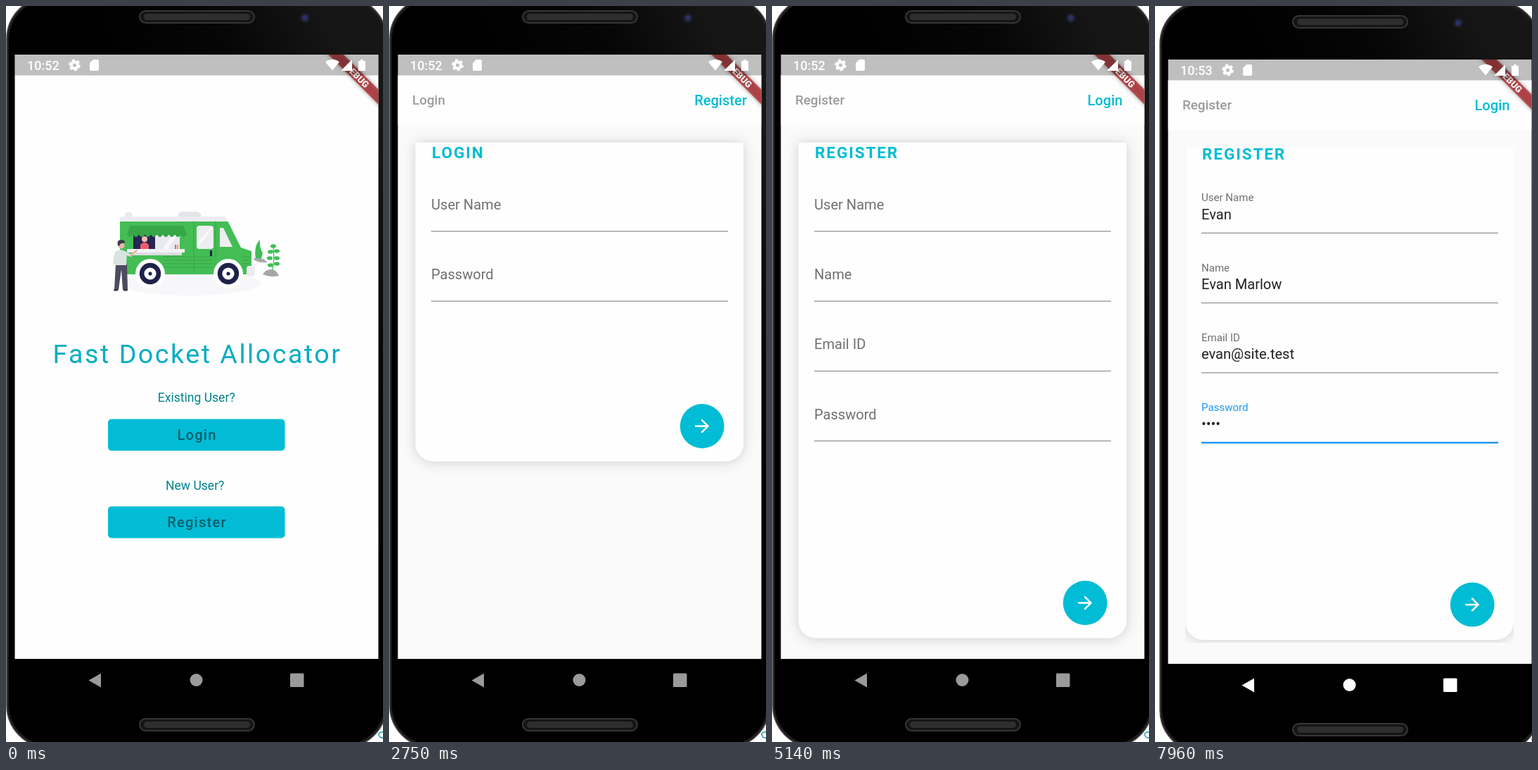
Animation of 536 by 1045 pixels, one loop 8 s. Source, as an HTML page:

```html
<!DOCTYPE html>
<html lang="en">
<head>
<meta charset="utf-8">
<title>App sign-up walkthrough</title>
<style>
  html, body { margin: 0; width: 100%; height: 100%; overflow: hidden; background: #fff; }
  svg { display: block; width: 536px; height: 1045px; font-family: Roboto, sans-serif; }
  text { white-space: pre; }
  .mid { text-anchor: middle; }
  .med { font-weight: 500; }
  .bold { font-weight: 700; }
  .black { font-weight: 900; }
  .line { fill: none; stroke-linecap: round; stroke-linejoin: round; }
  .card { filter: drop-shadow(0 1px 9px rgba(20, 20, 50, .19)); }
</style>
</head>
<body>
<svg id="stage" viewBox="0 0 536 1045"></svg>
<script>
const LOOP = 8000, TEAL = '#00bcd4', BLUE = '#2196f3', SLATE = '#455a64';
const START = performance.now();

const text = (x, y, size, fill, str, cls = '', ls = 0) =>
  `<text x="${x}" y="${y}" font-size="${size}" fill="${fill}" class="${cls}" letter-spacing="${ls}">${str}</text>`;
const rect = (x, y, w, h, fill, rx = 0, more = '') =>
  `<rect x="${x}" y="${y}" width="${w}" height="${h}" rx="${rx}" fill="${fill}" ${more}/>`;
const circle = (x, y, r, fill, more = '') => `<circle cx="${x}" cy="${y}" r="${r}" fill="${fill}" ${more}/>`;
const path = (d, fill, more = '') => `<path d="${d}" fill="${fill}" ${more}/>`;
const line = (d, stroke, w) => `<path class="line" d="${d}" stroke="${stroke}" stroke-width="${w}"/>`;
const group = (id, body, more = '') => `<g id="${id}" ${more}>${body}</g>`;
const clip = (id, x, y, w, h) => `<clipPath id="${id}">${rect(x, y, w, h, '#000')}</clipPath>`;
const band = (y, h, fill) => rect(12.5, y, 517, h, fill);

// Welcome screen
const wheel = x => circle(x, 380, 21, '#fff') + circle(x, 380, 15.2, '#1e2248') +
  circle(x, 380, 8.6, '#fff') + circle(x, 380, 2.6, '#1e2248');

function truck() {
  const scallops = 'M176 312H252L257 324' + 'q-4.25 8 -8.5 0'.repeat(10);
  const ribs = [356, 361, 366, 371].map(y => line(`M224 ${y}H294M336 ${y}H346`, '#38a548', 1)).join('');
  const leaves = [[380, 341], [376, 349], [385, 348], [375, 358], [385, 358], [376, 368], [385, 366]];
  return `<ellipse cx="262" cy="394" rx="100" ry="17" fill="#f7f7fa"/>` +
    rect(169, 293, 11, 8, '#e9e9ee', 4) + path('M245 300V296Q246 292 251 292H271Q277 292 278 300Z', '#e4e4ea') +
    path('M162 305H315L334 343L349 348V381H170L162 348Z', '#43bd54') +
    path('M162 306V302Q162 299 166 299H311L316 306Z', '#ececf0') + ribs +
    line('M267 306V378M298 306V358', '#38a548', 1) +
    rect(181, 325, 32, 21, '#262650') + rect(212, 325, 35, 21, '#e9e9f0') +
    path('M222 346L236 325H244L230 346Z', '#f7f7fb') +
    circle(197, 331, 4, '#f2b9ae') + path('M191 345V339Q197 332 203 339V345Z', '#ee5c6c') +
    path(scallops + 'Z', '#36a647') +
    rect(172, 345, 82, 5, '#f3f3f6') + rect(180, 350, 70, 4, '#dcdce3') +
    rect(240, 339, 2, 6, '#ee5c6c') + rect(243, 339, 2, 6, '#f0a23c') +
    rect(271, 312, 24, 33, '#ededf2', 4) + path('M273 336L291 314H295L274 341Z', '#fbfbfd') +
    path('M304 315H309L322 342H304Z', '#ededf2') + rect(290, 347, 3, 8, '#1e2248') +
    rect(342, 369, 12, 15, '#ececf0', 4) + wheel(205) + wheel(316) +
    path('M156 366H172L173 403H166L164 374L160 403H154Z', '#4b4b60') +
    line('M154 403.5H158M168 403.5H172', '#2d2d40', 2) +
    path('M155 349Q163 343 172 350L171 368H155Z', '#d9e4e2') +
    line('M156 352L154 365M172 352L177 354', '#d9e4e2', 4) + line('M177 354L186 347', '#eeb4a6', 2.5) +
    circle(164, 340, 4.6, '#eeb4a6') + path('M159 340Q157 331 165 332Q171 333 168 337Q162 336 161 341Z', '#3b3b4e') +
    path('M355 360Q352 340 361 332Q360 342 365 351L362 362Z', '#3fbf55') +
    path('M352 358Q353 365 372 364L366 359Z', '#a9a9ae') +
    path('M365 381Q369 374 377 374Q384 374 388 383Q376 386 365 381Z', '#a5a5a9') +
    line('M379 374Q382 360 380 343', '#3fbf55', 1.3) +
    leaves.map(([x, y]) => `<ellipse cx="${x}" cy="${y}" rx="4" ry="2.8" fill="#3fbf55"/>`).join('');
}

const button = (y, label) => rect(145, y, 251.5, 45, '#02bcd6', 5) +
  text(271.5, y + 29.5, 20.08, '#075f6d', label, 'mid med', 1.25);

const home = band(69, 858, '#fdfefd') + truck() +
  text(272, 507, 37.65, '#06acc3', 'Fast Docket Allocator', 'mid', 2.5) +
  text(270.7, 562, 17.57, '#00838f', 'Existing User?', 'mid') + button(586.5, 'Login') +
  text(268.7, 687, 17.57, '#00838f', 'New User?', 'mid') + button(710.5, 'Register');

// Form pages
function field(label, i, { values = [], focus = -1 }) {
  const y = 320 + i * 99.2, on = i === focus, up = on || values[i];
  return text(60, up ? y - 45 : y - 31, up ? 15.06 : 20.08, on ? BLUE : '#707070', label) +
    text(60, y - 19.5, 20.08, '#202020', values[i] || '') +
    rect(60, y - (on ? 1.2 : .7), 422, on ? 2.5 : 1.3, on ? BLUE : '#949494');
}

const arrow = (x, y) => path('M0 -8l-1.41 1.41L4.17 -1H-8v2H4.17l-5.58 5.59L0 8l8-8z', '#fff',
  `transform="translate(${x} ${y}) scale(1.255)"`);

function page(title, action, labels, bottom, opt = {}) {
  const { clipId, scroll = 0 } = opt, fabY = bottom - 50;
  const card = path(`M37.5 194H504V${bottom - 25}a25 25 0 0 1 -25 25H62.5a25 25 0 0 1 -25 -25Z`, '#fdfefd', 'class="card"') +
    text(61, 216, 22.6, TEAL, title.toUpperCase(), 'bold', 1.88) +
    labels.map((l, i) => field(l, i, opt)).join('') +
    circle(445.2, fabY, 31.4, TEAL) + arrow(445.2, fabY);
  return band(98, 829, '#fafafa') +
    `<g ${clipId ? `clip-path="url(#${clipId})"` : ''}><g transform="translate(0 ${-scroll})">${card}</g></g>` +
    band(98, 71, '#fdfefd') +
    text(33, 140, 18.83, '#9b9c9e', title, 'med') +
    text(action === 'Login' ? 473.5 : 471.5, 141, 20.08, TEAL, action, 'mid med');
}

const register = opt => page('Register', 'Login', ['User Name', 'Name', 'Email ID', 'Password'], 897.5, opt);

// Keyboard
function keyboard() {
  const row = (keys, x, y) => [...keys].map((k, i) => text(x + i * 51.1, y, 32.5, '#0f1b20', k, 'mid')).join('');
  const digits = [...'1234567890'].map((d, i) => text(56 + i * 51.1, 651, 13.5, '#7b858a', d, 'mid med')).join('');
  return band(572, 355, '#eceff1') + band(572, 56, '#e4e7e9') +
    path('M12 585H23a15 15 0 0 1 0 30H12Z', '#fff') + line('M22 595l6 5.5l-6 5.5', '#263238', 2.4) +
    text(269.5, 608, 20, '#4db6ac', 'Suggest contacts? Tap for info.', 'mid') +
    rect(501, 589, 7, 14, SLATE, 3.5) + line('M497.5 599a7 7 0 0 0 14 0M504.5 606V610', SLATE, 2) +
    digits + row('qwertyuiop', 40, 676) + row('asdfghjkl', 66, 750) + row('zxcvbnm', 117, 823) +
    line('M53 801L66 814H59.5V825H46.5V814H40Z', SLATE, 2.2) +
    line('M481 803H502V825H481L473 814ZM485 809.5l9 9m0 -9l-9 9', SLATE, 2.2) +
    text(53, 893, 21.5, '#37474f', '?123', 'mid med') + row(',', 117, 895) + row('.', 424, 896) +
    circle(168, 885, 11.8, 'none', `stroke="${SLATE}" stroke-width="2.2"`) +
    circle(164, 882, 1.8, SLATE) + circle(172, 882, 1.8, SLATE) + line('M162.5 888Q168 895 173.5 888', SLATE, 2) +
    rect(206, 867, 180, 36, '#c9cdd0', 3) +
    circle(488, 885.5, 22, '#4db6ac') + line('M479 886l6.5 6.5l12 -13', '#fff', 2.4);
}

// Phone shell and system bars
const speaker = y => rect(190, y, 163, 17, '#151515', 8.5, 'stroke="#363636" stroke-width="2"') +
  rect(196, y + 4, 151, 9, '#2e2e2e', 4.5);

const shell = rect(1, -13, 540, 1066, '#1d1d1d', 60, 'stroke="#4a4a4a" stroke-width="1.5"') +
  rect(4, -9, 534, 1058, 'url(#sheen)', 57) + speaker(7) + speaker(1012) +
  circle(425, 17, 7, '#1b1d2a') + circle(425, 17, 4, '#2a3060') + band(927, 60, '#000');

// The system bar is a dark veil over the app, with its icons on top
const status = band(69, 29.5, 'rgba(0,0,0,.25)') +
  `<text id="clock" x="30" y="90.5" font-size="18" fill="#fff" class="med"></text>` +
  circle(97.5, 84, 4.6, 'none', 'stroke="#fff" stroke-width="4"') +
  circle(97.5, 84, 7.2, 'none', 'stroke="#fff" stroke-width="2.4" stroke-dasharray="4 3.54"') +
  path('M124 76H130a2 2 0 0 1 2 2V90a2 2 0 0 1 -2 2H121a2 2 0 0 1 -2 -2V81Z', '#fff') +
  path('M454 79.5Q464 72 474 79.5L464 91.5Z', '#fff') + path('M492 76V92H476Z', '#fff') +
  path('M504 76H508V78H511V92H501V78H504Z', '#fff');

const ribbon = `<g transform="translate(529.5 69) rotate(45)">` +
  rect(-55, 35.1, 110, 15.1, 'rgba(171,30,34,.75)', 0, 'style="filter:drop-shadow(0 0 3px rgba(0,0,0,.45))"') +
  text(0, 47.2, 12.8, '#fff', 'DEBUG', 'mid black') + `</g>`;

const keyDots = [952, 956.5].map(y => [477, 481.5, 486, 490.5, 495]
  .map(x => rect(x - 1.2, y, 2.4, 2.4, 'currentColor')).join('')).join('');
const nav = group('back', path('M117.5 957.5L135 947.5V967.5Z', 'currentColor')) +
  group('down', path('M118 949H138L128 966.5Z', 'currentColor') + keyDots + rect(480, 961, 12, 2.2, 'currentColor')) +
  circle(270.5, 957, 9, 'currentColor') + rect(404, 947.5, 19.5, 19.5, 'currentColor', 1.5);

const $ = id => document.getElementById(id);
$('stage').innerHTML = `<defs>
  <linearGradient id="sheen" gradientUnits="userSpaceOnUse" x1="150" y1="120" x2="440" y2="-20">
    <stop offset="0" stop-color="#000"/><stop offset=".55" stop-color="#060606"/><stop offset="1" stop-color="#161616"/>
  </linearGradient>` +
  clip('screen', 12.5, 69, 517, 858) + clip('short', 37, 194, 467, 353.5) + clip('tall', 37, 194, 467, 703) +
  `</defs>` +
  group('phone',
    line('M538 1031Q529 1030 530 1035Q531 1040 538 1039', '#3aa6b5', 1.6) + shell +
    `<g clip-path="url(#screen)">` + band(69, 858, '#fdfefd') +
    group('home', home) +
    group('first', register()) +
    group('login', page('Login', 'Register', ['User Name', 'Password'], 646.5)) +
    group('second', register()) +
    group('typing', register({ clipId: 'short', focus: 0 }) +
      group('letter', text(60, 300.5, 20.08, '#202020', 'E')) +
      rect(0, 283, 2.5, 20.5, BLUE, 0, 'id="caret"') + keyboard()) +
    group('filled', register({ clipId: 'tall', scroll: 4.6, focus: 3,
      values: ['Evan', 'Evan Marlow', 'evan@site.test', '••••'] })) +
    `<circle id="ripple" fill="#000"/>` + ribbon + status + `</g>` +
    group('nav', nav));

// Timeline
const show = (id, on) => $(id).style.display = on ? '' : 'none';
const step = (t, table) => table.reduce((v, [at, val]) => t >= at ? val : v, table[0][1]);
const between = (t, a, b) => t >= a && t < b;

const SCENES = [[0, ['home']], [1390, ['first']], [2670, ['first', 'login']], [2750, ['login']],
  [5000, ['login', 'second']], [5140, ['second']], [5710, ['typing']], [7890, ['filled']]];
const SLIDE = {
  login: [[2670, 116], [2710, 38], [2750, 0]],
  second: [[5000, 310], [5030, 138], [5070, 40], [5140, 0]]
};
const CARET = [[0, 0], [5890, 60.5], [6390, 0], [6820, 72.5], [7210, 0], [7750, 72.5]];
const TAPS = [{ at: 2170, dt: 40, n: 9, x: 493 }, { at: 4500, dt: 35, n: 8, x: 479 }];

function ripple(t) {
  const tap = TAPS.find(p => between(t, p.at, p.at + p.dt * p.n));
  show('ripple', tap);
  if (!tap) return;
  const k = Math.floor((t - tap.at) / tap.dt) / tap.n, el = $('ripple');
  el.setAttribute('cx', tap.x);
  el.setAttribute('cy', 128);
  el.setAttribute('r', 44 + 9 * k);
  el.setAttribute('fill-opacity', .015 + .055 * Math.sin(Math.PI * k));
}

function render(t) {
  const on = step(t, SCENES), late = t >= 7890, typing = on[0] === 'typing';
  for (const id of ['home', 'first', 'login', 'second', 'typing', 'filled']) show(id, on.includes(id));
  for (const id in SLIDE) $(id).setAttribute('transform', `translate(${step(t, SLIDE[id])} 0)`);
  const x = step(t, CARET);
  show('caret', x);
  $('caret').setAttribute('x', x);
  show('letter', t >= 6820);
  show('back', !typing);
  show('down', typing);
  ripple(t);
  $('clock').textContent = late ? '10:53' : '10:52';
  $('nav').style.color = late ? '#fff' : '#9a9a9a';
  $('phone').setAttribute('transform', late ? 'translate(6 7)' : '');
}

function tick() {
  render((performance.now() - START) % LOOP);
  requestAnimationFrame(tick);
}
tick();
</script>
</body>
</html>
```
